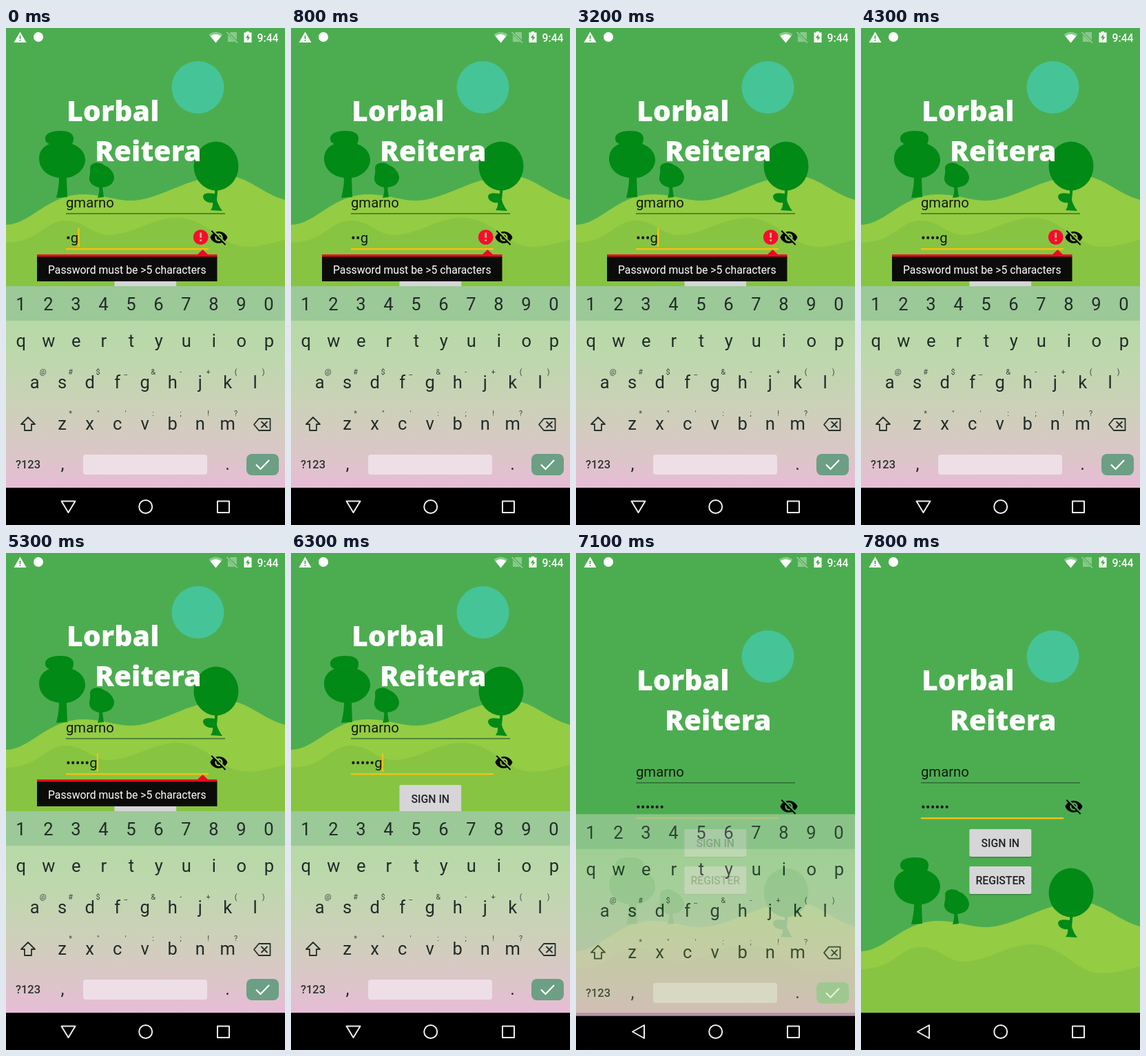
These frames come from a looping animation (405 px wide and 720 px high, 8 s). An HTML page:

```html
<!DOCTYPE html>
<html lang="es">
<head>
<meta charset="utf-8">
<title>Sign in</title>
<style>
  html, body { margin: 0; width: 100%; height: 100%; overflow: hidden; background: #000; }
  svg { display: block; width: 100%; height: 100%; }
  text { font-family: Roboto, sans-serif; white-space: pre; }
  .title { font: 800 41px "Open Sans", sans-serif; fill: #fff; }
  .field { font-size: 20.25px; fill: #111c12; }
  .small { font-size: 15.75px; }
  .medium { font-weight: 500; }
  .mid { text-anchor: middle; }
  .key { font-size: 25.5px; fill: #222c28; text-anchor: middle; }
  .hint { font-size: 11px; fill: #3a453f; text-anchor: middle; }
  .line { fill: none; stroke-linejoin: round; stroke-linecap: round; }
</style>
</head>
<body>
<svg viewBox="0 0 405 720">
  <defs>
    <linearGradient id="board" x1="0" y1="0" x2="0" y2="1">
      <stop offset="0" stop-color="#b0daa0"/>
      <stop offset=".35" stop-color="#bdd8ad"/>
      <stop offset=".6" stop-color="#ccd1b8"/>
      <stop offset=".85" stop-color="#dcc5c9"/>
      <stop offset="1" stop-color="#e7bcd7"/>
    </linearGradient>
    <g id="button">
      <rect x="157.3" y="1.5" width="90" height="40" rx="2" fill="#000" opacity=".22"/>
      <rect x="157.3" y="0" width="90" height="40" rx="2" fill="#d6d5d7"/>
    </g>
  </defs>

  <rect width="405" height="720" fill="#4cad50"/>

  <g id="land">
    <path fill="#94cc43" d="M0 577C34 577 58 536 107 533C140 532 160 543 185 542C230 538 265 506 320 506C350 506 372 532 405 541V666H0Z"/>
    <path fill="#87c441" d="M0 603C50 602 55 571 88 571C115 572 125 592 150 592C190 590 210 567 250 567C295 568 310 609 352 609C375 608 390 602 405 599V666H0Z"/>
    <g fill="#018a16">
      <path d="M57 453C56 445 66 441 78 441C90 441 98 444 98 452Q98 457 96 460C108 464 115 473 115 483C115 497 101 508 88 509L89 537L73 538Q77 522 77 509C60 507 48 496 48 481C48 470 55 463 63 460Q57 458 57 453Z"/>
      <path d="M122 494C123 486 137 485 143 491C151 494 157 502 157 509C156 519 148 522 140 523L142 537L133 538Q136 530 135 523C125 521 120 515 121 508Q123 501 122 494Z"/>
      <ellipse cx="305" cy="492" rx="32.5" ry="35.5"/>
      <path d="M303 520H308L306 541Q308 549 314 557L297 556Q301 551 300 545C292 546 286 541 286 536C287 530 296 531 303 532Z"/>
    </g>
  </g>

  <g id="form">
    <circle cx="278.5" cy="150" r="38" fill="#45c498"/>
    <text class="title" x="88" y="199">Lorbal</text>
    <text class="title" x="129" y="257">Reitera</text>
    <text class="field" x="87" y="324">gmarno</text>
    <rect x="87" y="332.3" width="231" height="1.2" fill="#245a2a"/>
    <text class="field" id="pass" x="87" y="375"></text>
    <rect id="caret" y="354" width="2.2" height="27" fill="#fdc010"/>
    <rect x="87" y="383" width="207" height="2.4" fill="#fabd12"/>
    <path transform="translate(295.3 353.6) scale(1.14)" d="M12 7c2.76 0 5 2.24 5 5 0 .65-.13 1.26-.36 1.83l2.92 2.92c1.51-1.26 2.7-2.89 3.43-4.75-1.73-4.39-6-7.5-11-7.5-1.4 0-2.74.25-3.98.7l2.16 2.16C10.74 7.13 11.35 7 12 7zM2 4.27l2.74 2.74C3.08 8.3 1.78 10.02 1 12c1.73 4.39 6 7.5 11 7.5 1.55 0 3.03-.3 4.38-.84L19.73 22 21 20.73 3.27 3zM7.53 9.8l1.55 1.55c-.05.21-.08.43-.08.65 0 1.66 1.34 3 3 3 .22 0 .44-.03.65-.08l1.55 1.55c-.67.33-1.41.53-2.2.53-2.76 0-5-2.24-5-5 0-.79.2-1.53.53-2.2zm4.31-.78l3.15 3.15.02-.16c0-1.66-1.34-3-3-3z"/>
    <use href="#button" y="400"/>
    <text class="small medium mid" x="202.3" y="426" fill="#222">SIGN IN</text>
    <use href="#button" y="454"/>
    <text class="small medium mid" x="202.3" y="480" fill="#222">REGISTER</text>
    <g id="alert">
      <circle cx="282.7" cy="367" r="10.8" fill="#fb0a30"/>
      <path d="M281.3 360.5h2.8v7.5h-2.8zm0 9.8h2.8v2.8h-2.8z" fill="#a9cc70"/>
    </g>
    <g id="popup">
      <path d="M45 392H278L285.5 385L293 392H306.5V396H45Z" fill="#ee0822"/>
      <rect x="45" y="395.3" width="261.5" height="35.7" fill="#0b0c0a"/>
      <text class="small" x="61" y="420" fill="#fff">Password must be &gt;5 characters</text>
    </g>
  </g>

  <rect y="666" width="405" height="54" fill="#000"/>

  <g id="keyboard">
    <rect y="374" width="405" height="292" fill="url(#board)"/>
    <rect y="374" width="405" height="50" fill="#9bc997"/>
    <g id="keys"></g>
    <rect x="112" y="618" width="180" height="29" rx="4" fill="#eedfe6"/>
    <text class="medium mid" x="32" y="638" font-size="16.5" fill="#2b3530">?123</text>
    <path class="line" d="M32 564L42 574H37V583H27V574H22Z" stroke="#26302b" stroke-width="1.8"/>
    <path class="line" d="M360 574.5L367 566H383.500V583H367ZM371 570.500L379 578.500M379 570.500L371 578.500" stroke="#26302b" stroke-width="1.8"/>
    <rect id="enter" x="349" y="617" width="47" height="31" rx="8"/>
    <path d="M363 632.500L369.500 639L382 626" fill="none" stroke="#fff" stroke-width="2.2"/>
  </g>

  <g class="line" stroke="#eee" stroke-width="2">
    <path id="back"/>
    <circle cx="202.7" cy="693.5" r="9.5"/>
    <rect x="307" y="685.500" width="17" height="16.500"/>
  </g>

  <g fill="#fff">
    <path fill-rule="evenodd" d="M20.500 5.500L29.500 21H11.500ZM19.600 11v5h1.800v-5zm0 6.200v1.800h1.800v-1.800z"/>
    <circle cx="47" cy="13" r="7"/>
    <path opacity=".35" d="M294.500 9.500Q304.500 2 314.500 9.500L304.500 21.500Z"/>
    <path d="M296.500 11.800Q304.500 6 312.500 11.800L304.500 21.500Z"/>
    <path opacity=".35" d="M326 6H335V17.500L324.500 7.500ZM322 10L333 20H322Z"/>
    <path opacity=".45" d="M320.500 6L336 21.500" stroke="#fff" stroke-width="1.500"/>
    <path fill-rule="evenodd" d="M349 5H353V6.500H356.500V21H345.500V6.500H349ZM352 9L347.800 14.500H350.500V18.500L354.500 13H352Z"/>
    <text class="small medium" x="364.5" y="20">9:44</text>
  </g>
</svg>
<script>
const LOOP = 8000, KEY_STEP = 40;
// [time, bullets, visible letters]
const TYPED = [[0, 1, 1], [300, 2, 1], [1800, 3, 0], [3200, 3, 1], [3800, 4, 1], [5300, 5, 1], [6800, 6, 0]];
const CARET_ON = [[0, 800], [1300, 1800], [2300, 2800], [3200, 3700], [3800, 4300], [4800, 5700], [6300, 6800], [7300, 7800]];
const VALID = 5300, ENTER = 6700, CLOSE = 7000;

const $ = id => document.getElementById(id);
const set = (id, attrs) => {
  for (const name in attrs) $(id).setAttribute(name, attrs[name]);
};
const ramp = (t, from, length) => Math.min(1, Math.max(0, (t - from) / length));

function label(text, x, y, kind) {
  const el = document.createElementNS('http://www.w3.org/2000/svg', 'text');
  el.setAttribute('class', kind);
  el.setAttribute('x', x);
  el.setAttribute('y', y);
  el.textContent = text;
  $('keys').append(el);
}

function row(keys, x, y, hints = '') {
  [...keys].forEach((key, i) => {
    label(key, x + i * KEY_STEP, y, 'key');
    if (hints) label(hints[i], x + 12 + i * KEY_STEP, y - 20, 'hint');
  });
}

row('1234567890', 21.3, 409);
row('qwertyuiop', 21.8, 462);
row('asdfghjkl', 41.7, 522, '@#$_&-+()');
row('zxcvbnm', 81.7, 582, '*"\':;!?');
label(',', 82, 640, 'key');
label('.', 321.5, 640, 'key');

function draw(t) {
  const closed = t >= CLOSE;
  const [, dots, tail] = TYPED.filter(step => t >= step[0]).pop();
  const caret = CARET_ON.some(([on, off]) => t >= on && t < off);
  const exit = ramp(t, CLOSE, 170);

  $('pass').textContent = '•'.repeat(dots) + 'g'.repeat(tail);
  set('caret', { x: 86.3 + $('pass').getComputedTextLength(), opacity: +caret });
  set('alert', { opacity: +(t < VALID) });
  set('popup', { opacity: 1 - ramp(t, VALID, 300) });
  set('land', { transform: `translate(0 ${closed ? 0 : -292})` });
  set('form', { transform: `translate(0 ${closed ? 0 : -64})` });
  set('keyboard', { opacity: 1 - exit ** 3, transform: `translate(0 ${29 * exit ** 3.5})` });
  set('enter', { fill: t < ENTER ? '#6c9f84' : '#a6caa5' });
  set('back', { d: closed ? 'M82 693.5L99 684V703Z' : 'M80.500 685.500H100.500L90.500 702Z' });
}

const start = performance.now();
function tick() {
  draw((performance.now() - start) % LOOP);
  requestAnimationFrame(tick);
}
tick();
</script>
</body>
</html>
```
